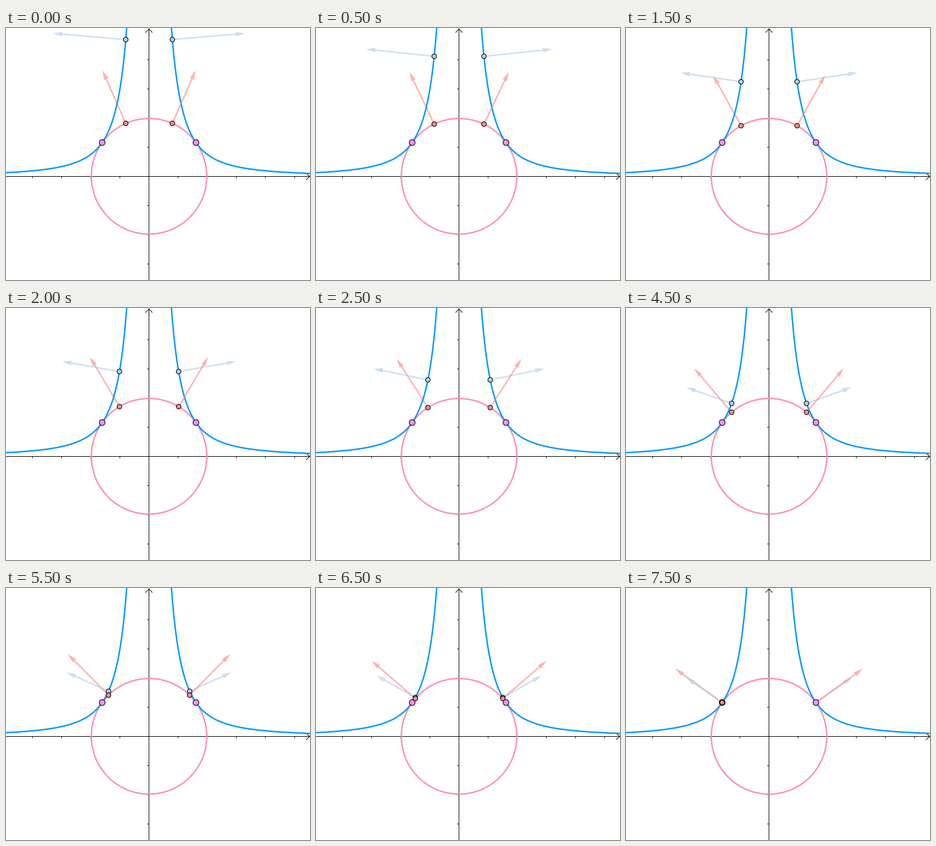
Write a matplotlib script that moves like this. It is 522 by 432 pixels and loops after 8 s.

```python
import numpy as np
import matplotlib.pyplot as plt
from matplotlib.animation import FuncAnimation
from matplotlib.patches import Circle, Polygon

W, H, DPI = 522, 432, 72          # at 72 dpi one point is one pixel
CX, CY, UNIT = 245.65, 254.2, 50
FRAMES, INTERVAL = 16, 500
X_START, X_END = 0.8, 1.61
K = 3                             # curve: x^2 * y = K
R = np.sqrt(3) * (K / 2) ** (1 / 3)   # circle tangent to the curve

BLUE, PINK = "#0099ff", "#ff8fb8"
RED_ARROW, BLUE_ARROW = "#ff7f7f", "#accbe3"
RED_DOT, BLUE_DOT, VIOLET_DOT = "#f98e8e", "#b4cfe8", "#f590f5"

fig = plt.figure(figsize=(W / DPI, H / DPI), dpi=DPI, facecolor="white")
ax = fig.add_axes([0, 0, 1, 1])
ax.set_xlim(0, W)
ax.set_ylim(H, 0)
ax.axis("off")


def to_px(x, y):
    return CX + UNIT * x, CY - UNIT * y


def stroke(xs, ys, color="black", width=1, z=1, **kw):
    ax.plot(xs, ys, color=color, lw=width, zorder=z, snap=False, **kw)


def dot(x, y, radius, color, z):
    patch = Circle(to_px(x, y), radius, fc=color, ec="black", lw=1.1,
                   zorder=z, snap=False)
    return ax.add_patch(patch)


def arrow(color, z):
    patch = Polygon(np.zeros((7, 2)), fc=color, ec="none", alpha=0.6,
                    zorder=z, snap=False)
    return ax.add_patch(patch)


def arrow_shape(start, vector, half=1.25, head=16, head_half=4):
    """Outline of a shaft with a solid head, in pixels."""
    p = np.array(to_px(*start))
    v = np.array([vector[0], -vector[1]]) * UNIT
    u = v / np.hypot(*v)
    n = np.array([-u[1], u[0]])
    tip = p + v
    neck = tip - head * u
    return [p + half * n, neck + half * n, neck + head_half * n, tip,
            neck - head_half * n, neck - half * n, p - half * n]


def draw_axes():
    x0, y0 = 245.5, 254.5         # pixel centres keep the lines crisp
    flat = dict(solid_capstyle="butt")
    stroke([0, W], [y0, y0], **flat)
    stroke([x0, x0], [1, H], **flat)
    for i in range(-4, 6):
        if i:
            x = x0 + UNIT * i
            stroke([x, x], [y0, y0 + 3], **flat)
    for i in range(-3, 5):
        if i:
            y = y0 - UNIT * i
            stroke([x0 - 3, x0], [y, y], **flat)
    stroke([x0 - 5.5, x0, x0 + 5.5], [7.5, 1.5, 7.5])
    stroke([515.5, 521.5, 515.5], [y0 - 5.5, y0, y0 + 5.5])


draw_axes()
ax.add_patch(Circle((CX, CY), R * UNIT, fill=False, ec=PINK, lw=2.5, zorder=2))
xs = np.linspace(0.7, 6, 500)
for side in (-1, 1):
    stroke(*to_px(side * xs, K / xs ** 2), color=BLUE, width=2.5, z=5)
    dot(side * X_END, K / X_END ** 2, 5, VIOLET_DOT, 7 if side < 0 else 10)

# per side: sign, curve arrow, circle arrow, curve dot, circle dot
movers = [(s, arrow(BLUE_ARROW, 4 if s < 0 else 3),
           arrow(RED_ARROW, 3 if s < 0 else 6),
           dot(0, 0, 4, BLUE_DOT, 8), dot(0, 0, 4, RED_DOT, 9))
          for s in (-1, 1)]


def update(i):
    x = X_START + (X_END - X_START) * i / (FRAMES - 1)
    y_curve, y_circle = K / x ** 2, np.sqrt(R ** 2 - x ** 2)
    artists = []
    for s, curve_arrow, circle_arrow, curve_dot, circle_dot in movers:
        on_curve, on_circle = (s * x, y_curve), (s * x, y_circle)
        gradient = (s * 2 * x * y_curve / 3, x ** 2 / 3)
        curve_arrow.set_xy(arrow_shape(on_curve, gradient))
        circle_arrow.set_xy(arrow_shape(on_circle, on_circle))
        curve_dot.center = to_px(*on_curve)
        circle_dot.center = to_px(*on_circle)
        artists += [curve_arrow, circle_arrow, curve_dot, circle_dot]
    return artists


anim = FuncAnimation(fig, update, frames=FRAMES, interval=INTERVAL,
                     repeat=True, repeat_delay=0)
plt.show()
```
